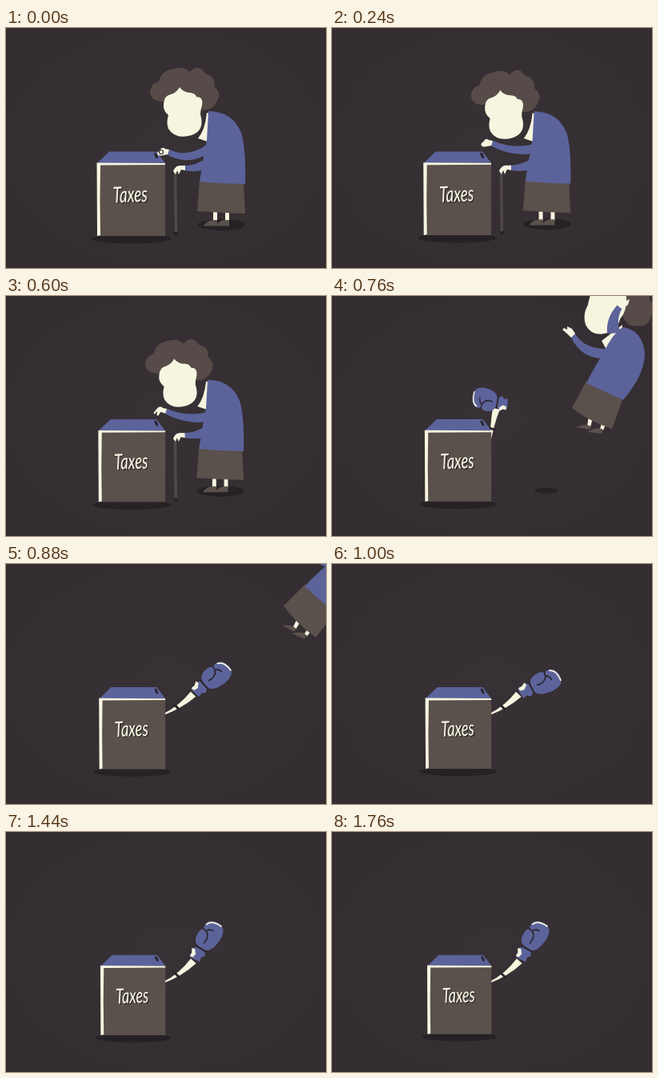
An HTML page that plays this animation: 400x300 px, repeating every 1.84 s.

```html
<!DOCTYPE html>
<html lang="en">
<head>
<meta charset="utf-8">
<title>Taxes</title>
<style>
  html, body { margin: 0; width: 100%; height: 100%; overflow: hidden; background: #352d31; }
  svg { display: block; width: 100vw; height: 100vh; }
  .blue { fill: #5c639b; }
  .cream { fill: #f6f6e0; }
  .gray { fill: #5a504c; }
  .hair { fill: #564b48; }
  .dark { fill: #262125; }
  .ink { fill: none; stroke: #2a2429; stroke-linecap: round; }
  text { font: italic 500 24px Lato, "Open Sans", sans-serif; }
</style>
</head>
<body>
<svg viewBox="0 0 400 300">
  <defs>
    <radialGradient id="bg" r=".75">
      <stop offset="0" stop-color="#373034"/>
      <stop offset="1" stop-color="#332c30"/>
    </radialGradient>
  </defs>
  <rect width="400" height="300" fill="url(#bg)"/>

  <g class="camera">
    <ellipse class="dark" cx="156.500" cy="263.500" rx="50" ry="6"/>
    <ellipse class="dark" id="footShadow" cx="269.500" cy="246"/>
  </g>

  <g id="punch">
    <path class="cream" id="arm"/>
    <path class="ink" id="band" stroke-width="3"/>
    <g id="glove">
      <path class="blue" d="M2 -6L6 -8L9 -6L13 -9L17 -6V7L12 9L9 6L3 7Z"/>
      <path class="cream" d="M3 -7L8 -7L13 -10L14 -6L9 -2L4 -3Z"/>
      <path class="blue" d="M19 -4Q20 -11 28 -12.500Q38 -14 41 -9.500Q48 -13 53.500 -7Q60 3 53 12Q46 17 33 14.500Q22 13 19 6Z"/>
      <path class="ink" d="M18 -7V8M41 -10Q41 -2 34 0Q30 1 26 0M40 -5Q45 -4 45 2" stroke-width="1.700"/>
      <path d="M48 -9Q56 -6 55 8" fill="none" stroke="#f6f6e0" stroke-width="1.800" stroke-linecap="round"/>
    </g>
  </g>

  <g class="camera">
    <path class="blue" d="M114 169L129 154.500H188L199 169Z"/>
    <path class="gray" d="M114 169H199V260H114Z"/>
    <path class="cream" d="M113.500 168.500L199 169V171L118 171.500L117.500 215L118 259L114 260Z"/>
    <path class="ink" d="M186.500 157.500L188.500 161.500" stroke-width="3"/>
    <g transform="translate(134 218.500) rotate(-2) scale(.79 1.150)">
      <text class="dark" x="1.500" y="1">Taxes</text>
      <text class="cream">Taxes</text>
    </g>

    <g id="standing">
      <path class="cream" d="M259 230H264V242H259ZM274 230H279V242H274Z"/>
      <path class="gray" d="M247 247.500Q251 241 258 240H264V247.500ZM262 247.500Q266 241 273 240H279V247.500Z"/>
      <path class="gray" d="M242 190L297 192L299 232Q268 231 239 229Z"/>
      <path class="cream" d="M251 106L255 107L252 142L240 138Q249 127 251 106Z"/>
      <path class="blue" d="M253 104Q283 104 294 131Q300 150 299 195Q270 195 242 192Q246 165 251 140Z"/>
      <path d="M211.500 178L212.500 258" stroke="#504849" stroke-width="3.500"/>
      <path class="dark" d="M210 255H215V259H210Z"/>
      <path class="blue" d="M222 172Q238 172 252 162L254 176Q238 181 223 178Z"/>
      <path class="cream" d="M224 172V178L219 177L216 183L214 178L212 183L209 179Q212 172 217 172Z"/>
      <path class="blue" id="sleeve"/>
      <g id="hand">
        <path class="cream" id="pinch" d="M9 -3L7 3L1 4Q-5 6 -6 1L-2 -3Q0 -7 4 -4Z"/>
        <path class="cream" id="open" d="M9 -3L7 3L1 1L-2 6L-4 5L-3 0L-7 4L-8 2L-3 -4Q1 -7 4 -4Z"/>
        <circle class="ink" id="coin" cx="-1" cy="0" r="2.500" stroke-width="1.200"/>
      </g>
      <g id="head">
        <path class="hair" d="M197 92Q181 92 180 80Q181 69 191 67Q194 53 210 51Q221 47 230 55Q241 43 249 57Q263 61 260 73Q270 81 264 91Q258 105 242 102L225 95Z"/>
        <path class="cream" d="M197 95Q198 84 206 83Q213 81 217 74Q222 81 231 81Q237 82 238 86Q247 86 245 97Q243 102 243 108Q249 128 232 134Q212 140 203 126Q200 118 203 109Q196 103 197 95Z"/>
      </g>
    </g>
  </g>

  <g id="flying">
    <path class="cream" d="M321 150L326 152L323 164L319 162ZM338 156L343 158L339 168L335 166Z"/>
    <path class="gray" d="M305 164Q313 161 319 161L324 163L322 167ZM319 170Q328 165 334 165L339 167L337 172Z"/>
    <path class="gray" d="M318 106L364 127Q357 148 350 166Q322 157 300 140Z"/>
    <path class="hair" d="M355 -20Q378 -20 385 -12Q398 -10 397 4Q405 16 398 27Q394 40 382 37Q372 40 366 30L355 10Z"/>
    <path class="cream" d="M337 56L363 36L362 52L343 67Z"/>
    <path class="blue" d="M363 39Q388 42 391 72Q391 98 364 130L318 109Q326 92 340 70Q350 48 363 39Z"/>
    <path class="cream" d="M330 -18Q362 -24 368 2Q369 18 360 29Q356 45 340 47Q324 50 317 36Q313 23 320 11Q322 -2 330 -18Z"/>
    <path class="blue" d="M299 52L304 47Q315 66 343 66L341 78Q312 79 299 52Z"/>
    <path class="cream" d="M304 47L299 52Q294 47 288 42L290 40L294 42L294 38L300 41Z"/>
    <path class="blue" d="M344 47Q342 27 357 11L363 15Q354 29 361 46Z"/>
    <path class="cream" d="M357 12L362 16L370 11L372 4L368 6L367 -2L364 4L359 1Z"/>
  </g>
</svg>
<script>
const LOOP = 1840, STEP = 40, HIT = 620;
const $ = id => document.getElementById(id);
const cameras = document.querySelectorAll(".camera");
const set = (id, attrs) => { for (const k in attrs) $(id).setAttribute(k, attrs[k]); };
const show = (id, on) => set(id, { visibility: on ? "inherit" : "hidden" });
const clamp = x => Math.max(0, Math.min(1, x));
const ease = x => (x = clamp(x), x * x * (3 - 2 * x));
const rad = deg => deg * Math.PI / 180;

function drawStanding(t) {
  const lift = ease(t / 240);
  const hx = 195 - 3 * lift, hy = 155 - 11 * lift;
  set("head", { transform: `translate(${-6 * lift} ${3 * lift}) rotate(${-2 * lift} 222 95)` });
  set("hand", { transform: `translate(${hx} ${hy})` });
  set("sleeve", { d: `M${hx + 9} ${hy - 3}Q228 ${hy + 8} 252 145L253 157Q226 ${hy + 18} ${hx + 6} ${hy + 3}Z` });
  show("coin", t < 120);
  show("pinch", t < 400);
  show("open", t >= 400);
}

function drawFlying(q) {
  const p = q - 1;
  set("flying", { transform: `translate(${70 * p} ${-86 * p}) rotate(${20 * p} 340 90)` });
}

// The arm rings like a damped spring after the blow.
function drawPunch(t) {
  const u = t - 760;
  const d = Math.exp(-0.0038 * u) * Math.cos(Math.PI * u / 200);
  const bend = Math.max(d, 0);
  const reach = clamp((t - 590) / 60);
  const x0 = 197, y0 = 188;
  const a = rad(36 + 14 * d + 30 * d * d);
  const r = (46 + 5 * d - 3 * d * d) * reach;
  const x = x0 + r * Math.cos(a), y = y0 - r * Math.sin(a);
  const cx = x0 + (21 - 18 * bend) * reach, cy = y0 - (9 + 19 * bend) * reach;
  const len = Math.hypot(x - cx, y - cy) || 1;
  const nx = (y - cy) / len * 4.5, ny = -(x - cx) / len * 4.5;
  set("arm", { d: `M${x0} ${y0 - 1}Q${cx + nx / 2} ${cy + ny / 2} ${x + nx} ${y + ny}` +
    `L${x - nx} ${y - ny}Q${cx - nx / 2} ${cy - ny / 2} ${x0} ${y0 + 1}Z` });
  const s = 0.42, mix = (p, c, e) => (1 - s) ** 2 * p + 2 * s * (1 - s) * c + s * s * e;
  const bx = mix(x0, cx, x), by = mix(y0, cy, y);
  set("band", { d: `M${bx + nx * .7} ${by + ny * .7}L${bx - nx * .7} ${by - ny * .7}` });
  // Swung back, the glove folds over the end of the arm.
  const squash = 1 - 0.17 * Math.min(1, bend);
  set("glove", { transform: `translate(${x + 16 * bend} ${y - 5 * bend}) ` +
    `rotate(${-(62 + 108 * d)}) scale(${squash * reach} ${reach})` });
}

function draw(t) {
  const zoom = 1 - 0.06 * t / 1760;
  const view = `translate(204 140) scale(${zoom}) translate(-204 -140)`;
  cameras.forEach(c => c.setAttribute("transform", view));

  const q = Math.max(0, (t - HIT) / 140);
  const hit = t >= HIT;
  show("standing", !hit);
  show("flying", hit && t < 1000);
  show("punch", hit);
  const spread = Math.max(0, 1 - q / 2);
  set("footShadow", { rx: 30 * spread, ry: 7 * spread });
  if (hit) {
    drawFlying(q);
    drawPunch(t);
    ["coin", "pinch", "open"].forEach(id => show(id, false));
  } else {
    drawStanding(t);
  }
}

const start = performance.now();
function tick() {
  const t = (performance.now() - start) % LOOP;
  draw(Math.min(1760, Math.floor(t / STEP) * STEP));
  requestAnimationFrame(tick);
}
tick();
</script>
</body>
</html>
```
